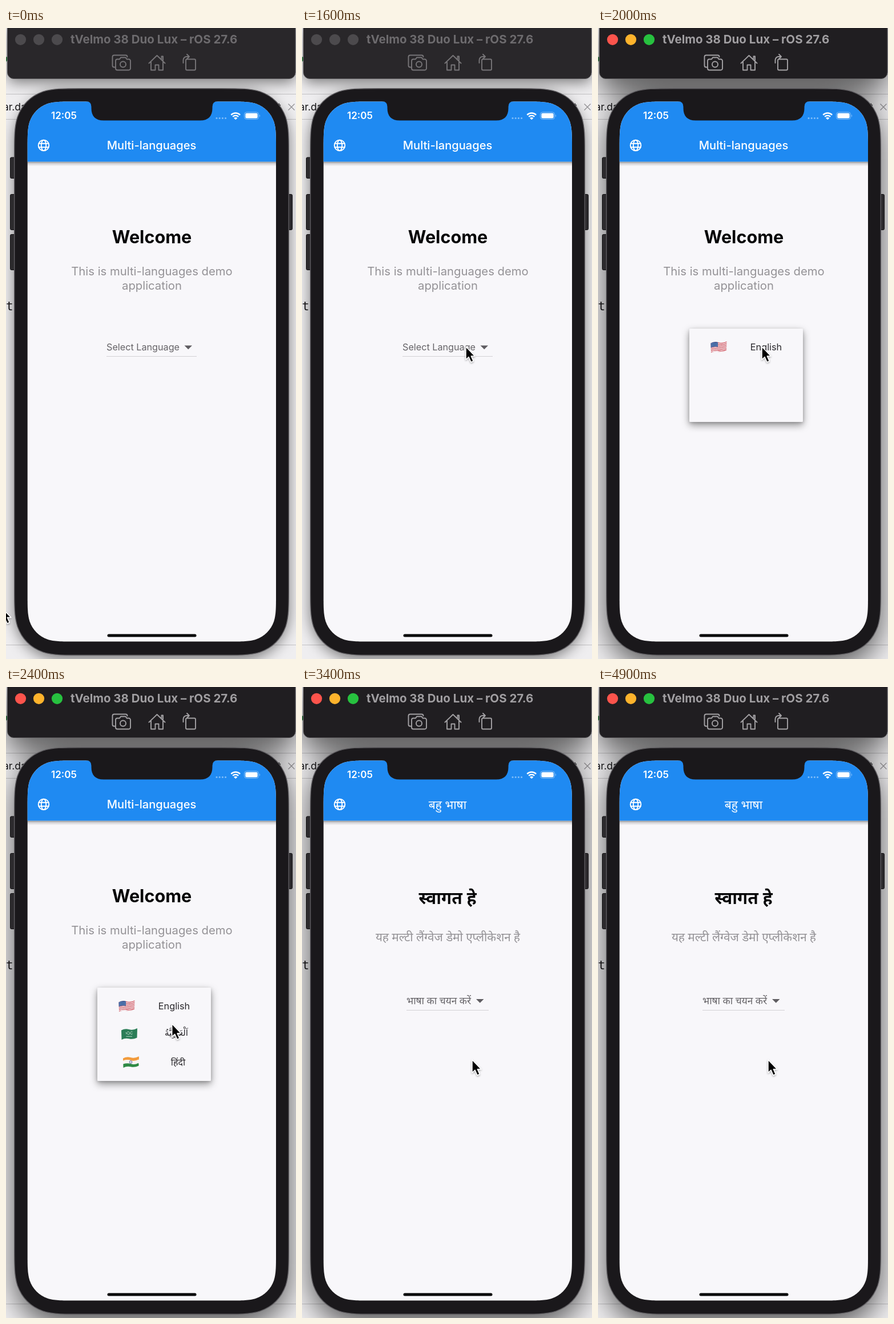
An HTML page that plays this animation: 508 px wide and 1102 px high, repeating every 5 s.

```html
<!DOCTYPE html>
<html lang="en">
<head>
<meta charset="utf-8">
<title>Language picker</title>
<style>
  html, body { margin: 0; width: 100%; height: 100%; overflow: hidden; background: #efeef0; }
  svg { display: block; width: 508px; height: 1102px; }
  text { font-family: Inter, "Noto Sans", "DejaVu Sans", sans-serif; }
  .hi text, .dev { font-family: "Noto Sans", "Noto Sans Devanagari", sans-serif; }
  .mid { text-anchor: middle; }
  .line { fill: none; stroke-linecap: round; stroke-linejoin: round; }
  .bar { fill: #29272a; }
  .caption { fill: #6d6b6e; font-weight: 700; font-size: 20.5px; }
  .tools { stroke: #777578; stroke-width: 1.9; }
  .light { fill: #4c4a4d; }
  .on .bar { fill: #201e21; }
  .on .caption { fill: #a09ea1; }
  .on .tools { stroke: #a3a1a4; }
  .on .red { fill: #fc544c; }
  .on .amber { fill: #fdb32c; }
  .on .green { fill: #27c13f; }
  .far, .on .near { display: none; }
  .on .far { display: inline; }
  .title { fill: #fff; font-size: 20.1px; font-weight: 500; }
  .head { fill: #050506; font-weight: 700; font-size: 30.6px; }
  .body { fill: #949296; font-size: 20.3px; }
  .hint { fill: #656367; font-size: 16.2px; }
  .item { fill: #2a282c; font-size: 16.3px; }
  .hi .title { font-size: 21px; font-weight: 400; }
  .hi .head { font-size: 29.8px; }
  .hi .body { font-size: 20.7px; }
  .hi .hint { font-size: 17.3px; }
  .rule { stroke: #d3d1d5; }
</style>
</head>
<body>
<svg id="stage" viewBox="0 0 508 1102">
  <defs>
    <filter id="soft" x="-30%" y="-60%" width="160%" height="220%"><feGaussianBlur stdDeviation="12"/></filter>
    <filter id="wide" x="-40%" y="-100%" width="180%" height="300%"><feGaussianBlur stdDeviation="25"/></filter>
    <filter id="lift" x="-30%" y="-30%" width="160%" height="170%">
      <feDropShadow dx="0" dy="5" stdDeviation="7" flood-opacity=".36"/>
      <feDropShadow dx="0" dy="2" stdDeviation="2.5" flood-opacity=".2"/>
    </filter>
    <filter id="drop" x="-60%" y="-30%" width="220%" height="180%">
      <feDropShadow dx="0" dy="1.5" stdDeviation="1.5" flood-opacity=".35"/>
    </filter>
    <linearGradient id="under" x2="0" y2="1">
      <stop stop-opacity=".42"/><stop offset=".4" stop-opacity=".15"/><stop offset="1" stop-opacity="0"/>
    </linearGradient>
    <clipPath id="screen"><path id="glass"/></clipPath>
    <clipPath id="cloth"><path d="M.5 3.500Q7 0 14 2T28.500 0L28 16.500Q21 20 14 18.300T1 20Z"/></clipPath>
  </defs>

  <!-- editor window behind -->
  <rect width="508" height="1102" fill="#efeef0"/>
  <path d="M0 115.5H508M0 159.5H508M0 1077.5H508" stroke="#c3c2c4"/>
  <path d="M0 50l2 1v6l-2 2z" fill="#3f8a52"/>
  <text x="-5" y="144" font-size="17.5" fill="#161517">ar.dart</text>
  <text x="476" y="144" font-size="17.5" fill="#161517">t</text>
  <path d="M494.5 132.5l11 11m0-11l-11 11" stroke="#929194" stroke-width="1.3"/>
  <text x="0" y="493" font-size="21" fill="#161517" style="font-family:'DejaVu Sans Mono',monospace">t</text>

  <g class="near" filter="url(#soft)">
    <rect x="4" y="0" width="502" height="95" rx="10" opacity=".5"/>
    <rect x="14" y="113" width="482" height="991" rx="84" opacity=".48"/>
  </g>
  <g class="far" filter="url(#wide)">
    <rect x="2" y="0" width="504" height="112" rx="10" opacity=".6"/>
    <rect x="14" y="120" width="482" height="996" rx="84" opacity=".62"/>
  </g>

  <!-- simulator toolbar -->
  <rect class="bar" x="2.5" y="-14" width="504.5" height="102.5" rx="11" stroke="#535154"/>
  <circle class="light red" cx="25.5" cy="20.3" r="9.6"/>
  <circle class="light amber" cx="57.5" cy="20.3" r="9.6"/>
  <circle class="light green" cx="89.5" cy="20.3" r="9.6"/>
  <text class="caption" x="113" y="27">tVelmo 38 Duo Lux – rOS 27.6</text>
  <g class="tools line">
    <path d="M191 68.5h-1.5a3 3 0 0 1-3-3v-15a3 3 0 0 1 3-3h20a3 3 0 0 1 3 3"/>
    <path d="M195 54.5h4l2-3h8.5l2 3h3.5a3 3 0 0 1 3 3v13a3 3 0 0 1-3 3h-20a3 3 0 0 1-3-3v-13a3 3 0 0 1 3-3z"/>
    <circle cx="205" cy="63.5" r="5"/>
    <path d="M250.5 61.5L264.5 48l14 13.5M254 59v14.5h7.5v-9h6v9h7.5V59M272.500 54v-4.500h2.500v7"/>
    <rect x="315" y="54.5" width="17" height="19" rx="2"/>
    <path d="M310.5 61v-5a6 6 0 0 1 6-6h4M317 46l4 4-4 4"/>
  </g>

  <!-- phone body -->
  <g fill="#2d2b2e" stroke="#121113">
    <rect x="7.5" y="226" width="12" height="36.5" rx="2"/>
    <rect x="7.5" y="290.5" width="12" height="62" rx="2"/>
    <rect x="7.5" y="360.5" width="12" height="62" rx="2"/>
    <rect x="489" y="290.5" width="12.5" height="62" rx="2"/>
  </g>
  <path id="shell" fill="#1a181b" stroke="#5f5d61" stroke-width="1.4"/>
  <g clip-path="url(#screen)">
    <rect x="37" y="128" width="437" height="945" fill="#f8f7fa"/>
    <rect x="37" y="233.500" width="437" height="8" fill="url(#under)"/>
    <rect x="37" y="128" width="437" height="105.500" fill="#1f8af2"/>
  </g>
  <path d="M140 128q9.500 0 9.500 9.500v2.500q0 21.500 21.500 21.500h169q21.500 0 21.500-21.500v-2.500q0-9.500 9.500-9.500z" fill="#1a181b"/>
  <text x="79" y="159" font-size="17" font-weight="600" fill="#fff">12:05</text>
  <path class="line" d="M369 157.5h16" stroke="#7fbdf8" stroke-width="3.2" stroke-dasharray="0 5.2"/>
  <path d="M394.3 151.8a11 11 0 0 1 15.8 0M397.2 155a7 7 0 0 1 10 0" fill="none" stroke="#fff" stroke-width="2.4"/>
  <path d="M399 157.3a4.6 4.6 0 0 1 6.4 0l-3.2 3z" fill="#fff"/>
  <rect x="417.5" y="147" width="25" height="12.5" rx="4" fill="none" stroke="#85bff8"/>
  <rect x="419.3" y="148.8" width="21.4" height="8.9" rx="2.3" fill="#fff"/>
  <path d="M444 151q2 2.3 0 4.5z" fill="#85bff8"/>
  <g class="line" stroke="#fff" stroke-width="1.9">
    <circle cx="66" cy="205" r="9.3"/><ellipse cx="66" cy="205" rx="4.2" ry="9.3"/>
    <path d="M57.5 201.8h17M57.5 208.2h17"/>
  </g>
  <rect x="177.5" y="1058.5" width="156" height="5" rx="2.5" fill="#050506"/>

  <g id="en">
    <text class="title mid" x="255" y="212">Multi-languages</text>
    <text class="head mid" x="255.5" y="375.5">Welcome</text>
    <text class="body mid" x="255.5" y="432">This is multi-languages demo</text>
    <text class="body mid" x="255.5" y="456.5">application</text>
    <text class="hint" x="176" y="563">Select Language</text>
    <path d="M312.5 554.5h13.5l-6.75 6.8z" fill="#5f5d61"/>
    <path class="rule" d="M176 573.5H334"/>
  </g>
  <g id="hi" class="hi" lang="hi">
    <text class="title mid" x="255" y="212.5">बहु भाषा</text>
    <text class="head mid" x="255" y="379">स्वागत हे</text>
    <text class="body mid" x="255.5" y="444">यह मल्टी लैंग्वेज डेमो एप्लीकेशन है</text>
    <text class="hint" x="183" y="554">भाषा का चयन करें</text>
    <path d="M305 545h13.5l-6.75 6.8z" fill="#5f5d61"/>
    <path class="rule" d="M183 564.5H327"/>
  </g>

  <g id="menu">
    <rect id="sheet" x="160" width="199" rx="2" fill="#f8f7fa" filter="url(#lift)"/>
    <g class="row">
      <g transform="translate(197 547)"><g id="us" clip-path="url(#cloth)"></g></g>
      <text class="item mid" x="294.5" y="563">English</text>
    </g>
    <g class="row">
      <g transform="translate(201.5 596)"><g id="sa" clip-path="url(#cloth)"></g></g>
      <text class="item mid" x="298.5" y="609" style="font-family:'DejaVu Sans',sans-serif;font-size:15px">اَلْعَرَبِيَّةُ</text>
    </g>
    <g class="row">
      <g transform="translate(204.5 645)"><g id="in" clip-path="url(#cloth)"></g></g>
      <text class="item mid dev" x="301.5" y="661" lang="hi">हिंदी</text>
    </g>
  </g>

  <path id="pointer" d="M0 0V22.5L5 18L9 27L13.2 25.2L9.3 16.5H15.8Z" fill="#050506" stroke="#fff" stroke-width="1.5" stroke-linejoin="round" filter="url(#drop)"/>
</svg>
<script>
const LOOP = 5000, TICK = 100;
const ACTIVE = 1800, OPEN = 1820, CLOSE = 3100, SWITCH = 3200;
const $ = id => document.getElementById(id);
const rows = document.querySelectorAll('.row');

// pointer stops: time, x, y
const path = [
  [0, -7, 1013], [700, 264, 610.5], [1100, 264, 610.5], [1500, 287, 556.5],
  [2200, 287, 556.5], [2700, 297.5, 647], [2800, 297.5, 647], [3000, 298, 651], [LOOP, 298, 651]
];

const clamp = v => Math.min(1, Math.max(0, v));
const span = (v, a, b) => clamp((v - a) / (b - a));
const mix = (a, b, k) => a + (b - a) * k;
const ease = k => k * k * (3 - 2 * k);

// rectangle whose corners blend smoothly into the straight sides
function squircle(x0, y0, x1, y1, r) {
  const bend = [[1.529, 0], [1.088, 0], [.868, 0], [.65, .07], [.373, .169], [.169, .373], [.07, .65], [0, .868], [0, 1.088], [0, 1.529]];
  const corner = (x, y, sx, sy, flip) => {
    const p = bend.map(([u, v]) => `${x + sx * u * r} ${y + sy * v * r}`);
    if (flip) p.reverse();
    return `${p[0]}C${p.slice(1).join(' ')}`;
  };
  return `M${corner(x0, y0, 1, 1, true)}L${corner(x1, y0, -1, 1)}L${corner(x1, y1, -1, -1, true)}L${corner(x0, y1, 1, -1)}Z`;
}

// one wavy band of a flag
const band = (y, w, color) =>
  `<path d="M-1 ${y}Q7 ${y - 3.5} 14 ${y - 1.2}T29 ${y - 3}" fill="none" stroke="${color}" stroke-width="${w}"/>`;

function drawFlags() {
  let stripes = '';
  for (let i = 0; i < 13; i++) stripes += band(3.9 + i * 1.36, 1.45, i % 2 ? '#f3eef0' : '#cf4450');
  $('us').innerHTML = stripes +
    '<path d="M0 0H13V10Q7 8.5 0 11.5Z" fill="#3c629f"/>' +
    '<path d="M2 4.5h10M2 7h10M2 9.3h10" stroke="#c9d5e8" stroke-width=".8" stroke-dasharray=".8 1.5"/>';
  $('sa').innerHTML = '<path d="M0 0H29V20H0Z" fill="#2b7d57"/>' +
    '<path d="M8 7q1.5 3 3 0t3 0t3 0t3 0M8.5 10q1.5-2 3 0t3 0t3 0t2.5-1M9 14.3h10.5" fill="none" stroke="#c4dccf" stroke-width=".9"/>';
  $('in').innerHTML = band(5, 7, '#f29b3c') + band(11.3, 6.2, '#f7f4f1') + band(17.8, 7, '#2e8a45') +
    '<circle cx="14" cy="10" r="2.3" fill="none" stroke="#4858a0" stroke-width=".9"/><circle cx="14" cy="10" r=".6" fill="#4858a0"/>';
}

function movePointer(t) {
  const i = path.findIndex(p => p[0] > t);
  const [t0, x0, y0] = path[i - 1], [t1, x1, y1] = path[i];
  const k = ease(span(t, t0, t1));
  $('pointer').setAttribute('transform', `translate(${mix(x0, x1, k)} ${mix(y0, y1, k)})`);
}

function drawMenu(t) {
  const p = clamp((t - OPEN) / 300);
  const grow = span(p, .25, .5);
  const top = mix(533, 525, grow), bottom = mix(582, 688, grow);
  $('sheet').setAttribute('y', top);
  $('sheet').setAttribute('height', bottom - top);
  $('menu').style.opacity = t < CLOSE ? span(p, 0, .25) : t < SWITCH ? .5 : 0;
  rows.forEach((row, i) => {
    const start = .5 + (i + 1) / 9;
    row.style.opacity = i ? span(p, start, start + 1 / 6) : 1;
  });
}

function render(t) {
  $('stage').classList.toggle('on', t >= ACTIVE);
  $('en').style.display = t < SWITCH ? '' : 'none';
  $('hi').style.display = t < SWITCH ? 'none' : '';
  drawMenu(t);
  movePointer(t);
}

const begin = performance.now();
let last = -1;
function frame(now) {
  const t = Math.floor((Math.max(0, now - begin) % LOOP) / TICK) * TICK;
  if (t !== last) render(last = t);
  requestAnimationFrame(frame);
}
$('shell').setAttribute('d', squircle(14.7, 105.7, 495.3, 1095.3, 77));
$('glass').setAttribute('d', squircle(37.7, 128.5, 473, 1071.5, 54));
drawFlags();
render(0);
requestAnimationFrame(frame);
</script>
</body>
</html>
```
